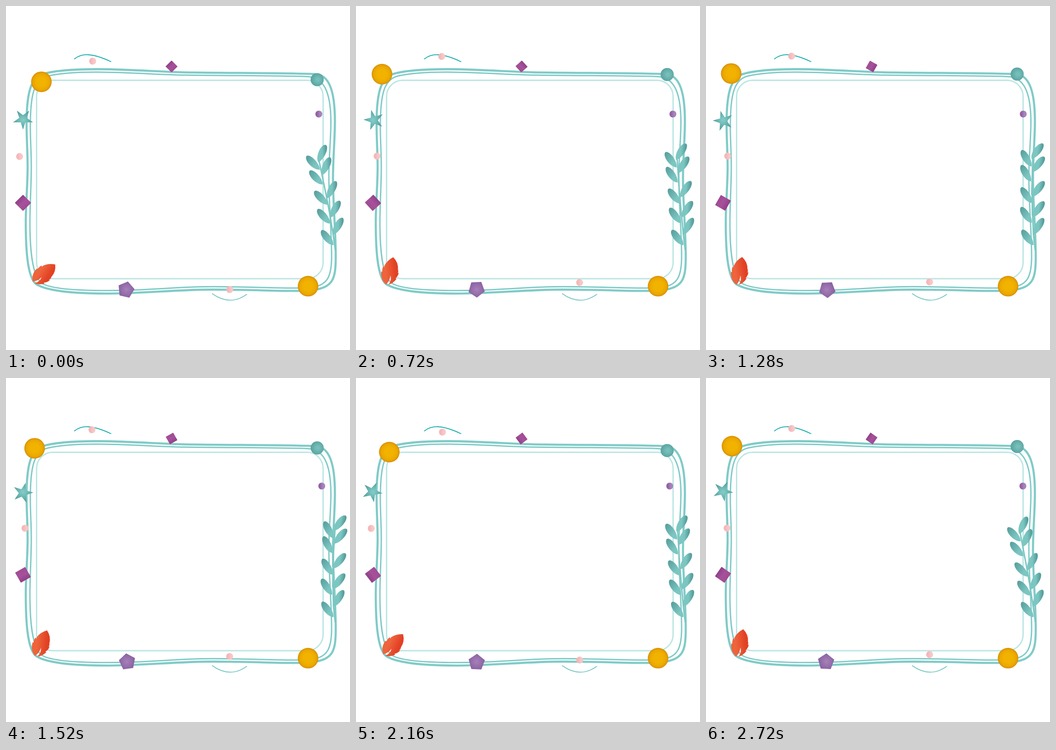
Write an HTML page that moves like this. It is 748 px wide and 748 px high and loops after 2800 ms.

```html
<!DOCTYPE html>
<html lang="en">
<head>
<meta charset="utf-8">
<title>Decorated frame</title>
<style>
@property --drift { syntax: "<number>"; inherits: true; initial-value: 0; }
@property --bend { syntax: "<number>"; inherits: true; initial-value: 0; }
@property --spin { syntax: "<angle>"; inherits: true; initial-value: 0deg; }

html, body { margin: 0; width: 100%; height: 100%; overflow: hidden; background: #fff; }
svg {
  display: block; width: 100vw; height: 100vh;
  animation: drift 2800ms -8ms infinite, bend 2800ms -8ms infinite, spin 2800ms -8ms steps(35) infinite;
}

/* the loop has 35 ticks of 80 ms */
@keyframes drift {
  0% { --drift: 0; animation-timing-function: steps(13); }
  37.143% { --drift: 1; animation-timing-function: steps(12); }
  71.429% { --drift: 0; animation-timing-function: steps(10); }
  100% { --drift: .769; }
}
@keyframes bend {
  0% { --bend: 0; animation-timing-function: steps(10); }
  28.571% { --bend: .57; animation-timing-function: steps(9); }
  54.286% { --bend: 1; animation-timing-function: steps(8); }
  77.143% { --bend: .545; animation-timing-function: steps(8); }
  100% { --bend: 0; }
}
@keyframes spin { to { --spin: 360deg; } }

.drift { transform: translate(calc(var(--x) * var(--drift)), calc(var(--y) * var(--drift))); }
.sway { transform-origin: 71.2px 591.8px; transform: rotate(calc(-55deg * var(--drift))); }
.spin { transform-origin: var(--o); transform: rotate(var(--spin)); }
.joint {
  transform-origin: var(--o);
  transform: translate(calc(var(--x, 0px) * var(--bend)), calc(var(--y, 0px) * var(--bend))) rotate(calc(var(--a) * var(--bend)));
}
.line { fill: none; stroke: #80cbc7; }
.stem { stroke: #7cc6c2; stroke-width: 3; stroke-linecap: round; }
</style>
</head>
<body>
<svg viewBox="0 0 748 748">
  <defs>
    <radialGradient id="gold">
      <stop offset=".45" stop-color="#f2b200"/><stop offset=".8" stop-color="#eaa800"/><stop offset="1" stop-color="#d88e04"/>
    </radialGradient>
    <radialGradient id="teal" cx=".55">
      <stop offset=".2" stop-color="#77bfba"/><stop offset="1" stop-color="#5ba5a2"/>
    </radialGradient>
    <radialGradient id="star">
      <stop offset=".1" stop-color="#80cac6"/><stop offset="1" stop-color="#559f9d"/>
    </radialGradient>
    <radialGradient id="violet">
      <stop offset="0" stop-color="#a781b9"/><stop offset="1" stop-color="#8a62a2"/>
    </radialGradient>
    <linearGradient id="pink">
      <stop offset=".3" stop-color="#f5b7b9"/><stop offset=".65" stop-color="#f9c6c7"/>
    </linearGradient>
    <linearGradient id="lilac">
      <stop offset=".25" stop-color="#955fa5"/><stop offset=".65" stop-color="#a683ba"/>
    </linearGradient>
    <linearGradient id="plum">
      <stop offset="0" stop-color="#904089"/><stop offset=".5" stop-color="#a6519a"/><stop offset="1" stop-color="#a04b94"/>
    </linearGradient>
    <linearGradient id="fire" x1=".15" y1=".3" x2=".85" y2=".7">
      <stop offset=".25" stop-color="#ee643c"/><stop offset=".8" stop-color="#e24124"/>
    </linearGradient>
    <linearGradient id="tipShade" gradientUnits="userSpaceOnUse" x1="-5" y1="-41" x2="2" y2="-14">
      <stop offset="0" stop-color="#569d9b"/><stop offset="1" stop-color="#7cc6c2"/>
    </linearGradient>
    <linearGradient id="sideShade" gradientUnits="userSpaceOnUse" x1="8" y1="-27" x2="-3" y2="-21">
      <stop offset="0" stop-color="#569d9b"/><stop offset=".8" stop-color="#7cc6c2"/>
    </linearGradient>
    <path id="leaf" d="M0 0C-10-8-11-33-3-40Q0-43 3-40C10-32 8-8 0 0Z"/>
    <use id="left" href="#leaf" fill="url(#tipShade)"/>
    <use id="right" href="#leaf" fill="url(#sideShade)"/>
  </defs>

  <rect x="66.5" y="161.5" width="623" height="431.5" rx="35" class="line" style="stroke:#bde6e3" stroke-width="3"/>
  <path class="line" stroke-width="3" d="M90 152.5C120 145 160 143.5 200 143.7C270 144 330 149.5 390 150.3C480 151.5 580 151 655 153.5C690 154 706 185 706.5 250C706.5 290 702 330 702 370C702 430 708 490 708 545C708 590 698 607 665 612C620 616 560 610.5 450 610.3C370 610.3 310 618.5 225 618.7C150 619 100 615 80 604C55 590 52 520 52 470C52 430 55 390 55 350C55 310 52 280 53 250C54 190 62 160 90 152.5Z"/>
  <path class="line" stroke-width="4.6" d="M80 148C110 139 160 137.3 200 137.4C270 137.6 330 143 385 144.2C480 146 580 145 672 148C703 149 715 185 715.2 250C715.2 290 711 330 711 375C711 430 717 490 717 545C717 595 711 612 665 618C620 622 560 617 450 616.6C370 616.6 310 624.5 225 625.2C150 625.5 90 620 66 605C45 590 43 520 43 470C43 430 47 390 47 350C47 310 44 280 44.8 245C46 185 55 157 80 148Z"/>
  <path class="line" style="stroke:#17abad" stroke-width="1.8" stroke-linecap="round" d="M149 115C164 103 186 101 228 121"/>
  <path class="line" style="stroke:#70c4c0" stroke-width="1.6" stroke-linecap="round" d="M448.5 625.5Q487 653 523.5 627"/>

  <g class="joint" style="--o:713px 521px;--a:2deg">
    <path class="stem" d="M716 530L711 495"/>
    <use href="#left" transform="translate(712 520) rotate(-38.8)"/>
    <use href="#right" transform="translate(712 497) rotate(29)"/>
    <g class="joint" style="--o:711px 495px;--a:6deg;--y:-1px">
      <path class="stem" d="M711 495L705 458"/>
      <use href="#left" transform="translate(705 473) rotate(-41.6)"/>
      <use href="#right" transform="translate(706 460) rotate(28.7)"/>
      <g class="joint" style="--o:705px 458px;--a:3.5deg;--x:-1px;--y:-2px">
        <path class="stem" d="M705 458L697 415"/>
        <use href="#left" transform="translate(700 432) rotate(-45)"/>
        <use href="#right" transform="translate(699 418) rotate(27)"/>
        <g class="joint" style="--o:697px 415px;--a:4deg;--x:-1.2px;--y:-1.5px">
          <path class="stem" fill="none" d="M697 415Q688 372 681 338"/>
          <use href="#left" transform="translate(689 388) rotate(-44)"/>
          <use href="#right" transform="translate(688 367) rotate(24)"/>
          <use href="#left" transform="translate(682.5 356) rotate(-44.5)"/>
          <use href="#right" transform="translate(679 340) rotate(23.5)"/>
        </g>
      </g>
    </g>
  </g>

  <path class="sway" fill="url(#fire)" d="M107 562Q92 559 80 565L78 567.5L77.5 564Q71 568 69 572L67.500 570.5Q55 582 58 599Q70 598 77.500 589.5Q74 600 62 602.500Q70 607 84 603.500L82 601.500Q90 601 95.500 596L93.500 595Q97 594 98.500 589.500Q109 578 107 562Z"/>

  <g class="spin" style="--o:37px 248px"><path id="starShape" fill="url(#star)"/></g>
  <g class="spin" style="--o:262.300px 616.900px"><path id="pentagon" fill="url(#violet)"/></g>
  <g class="spin" style="--o:360px 131.500px">
    <rect x="350.7" y="122.2" width="18.6" height="18.6" rx=".8" fill="url(#plum)" transform="rotate(45 360 131.500)"/>
  </g>
  <g class="spin" style="--o:37px 428px">
    <rect x="24.4" y="415.4" width="25.200" height="25.200" rx="1" fill="url(#plum)" transform="rotate(45 37 428)"/>
  </g>

  <circle class="drift" style="--x:-29.600px;--y:-24px" cx="77" cy="164.800" r="22.400" fill="url(#gold)"/>
  <circle cx="656.800" cy="609.200" r="22.400" fill="url(#gold)"/>
  <circle class="drift" style="--x:0px;--y:-16.200px" cx="676.600" cy="160.200" r="14.300" fill="url(#teal)"/>
  <circle class="drift" style="--x:12.800px;--y:0px" cx="680.200" cy="234.900" r="7.500" fill="url(#lilac)"/>
  <g fill="url(#pink)">
    <circle class="drift" style="--x:-3px;--y:-14.600px" cx="188.400" cy="119.900" r="7.500"/>
    <circle class="drift" style="--x:23.500px;--y:-1.300px" cx="29.500" cy="327.300" r="7.500"/>
    <circle class="drift" style="--x:-.5px;--y:-22.200px" cx="486.500" cy="616.600" r="7.500"/>
  </g>
</svg>
<script>
const polygon = (id, cx, cy, radii, count, start) => {
  const points = Array.from({ length: count }, (_, i) => {
    const a = (start + i * 360 / count) * Math.PI / 180;
    const r = radii[i % radii.length];
    return `${cx + r * Math.cos(a)} ${cy + r * Math.sin(a)}`;
  });
  document.getElementById(id).setAttribute("d", `M${points.join("L")}Z`);
};
polygon("starShape", 37, 246, [22.8, 8.7], 10, 90);
polygon("pentagon", 260.9, 617.1, [18.6], 5, -77);
</script>
</body>
</html>
```
